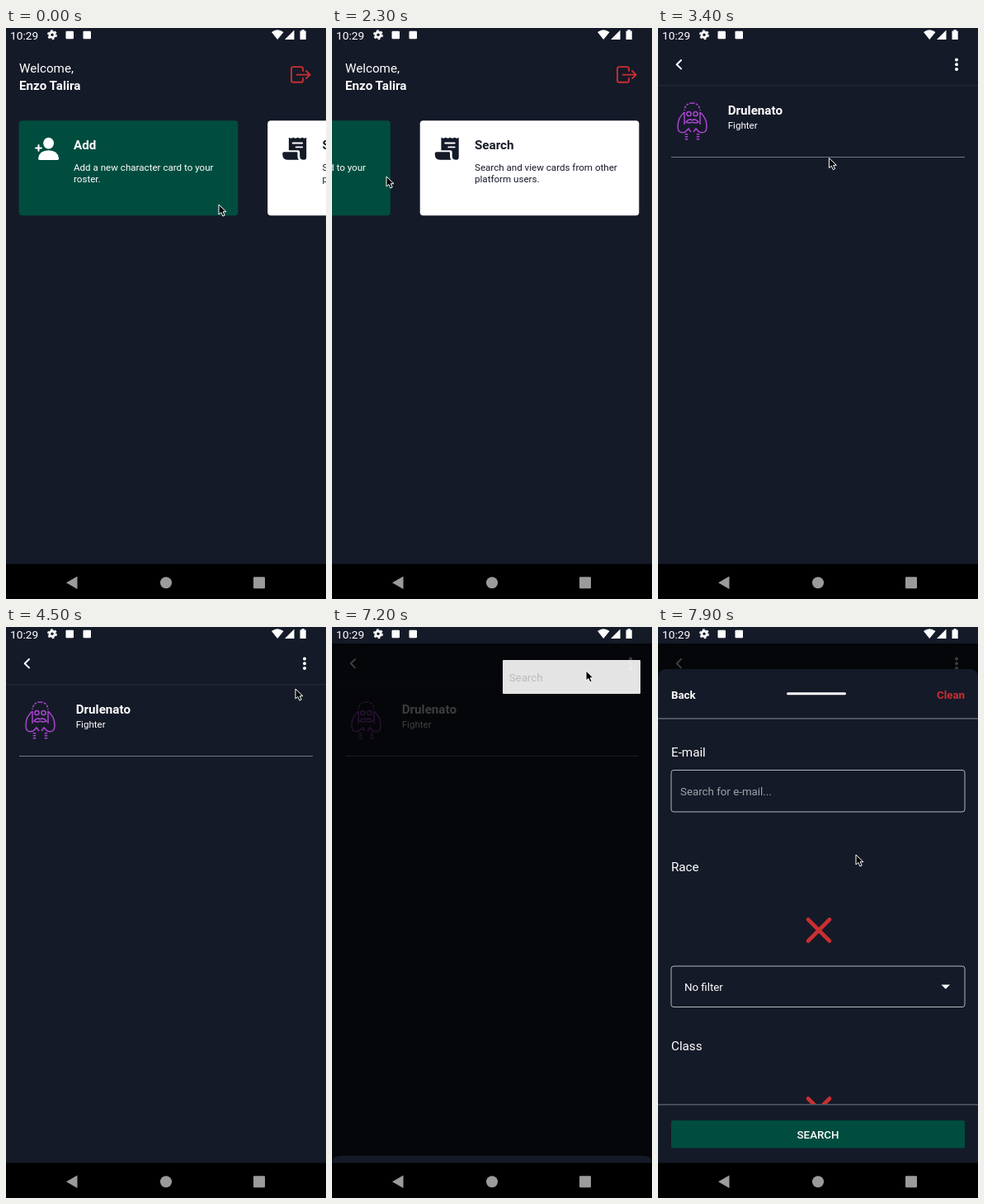
Write an HTML page that moves like this. It is 388 px wide and 692 px high and loops after 8 s.

```html
<!DOCTYPE html>
<html lang="en">
<head>
<meta charset="utf-8">
<title>Character cards</title>
<style>
  html, body { margin: 0; width: 100%; height: 100%; overflow: hidden; background: #000; }
  svg { display: block; }
  text { font: 13.3px Roboto, sans-serif; fill: #fff; }
  .title { font-size: 15.2px; }
  .small { font-size: 11.6px; }
  .bold { font-weight: 700; }
  .ink text, .bg { fill: #151a28; }
  .line { fill: none; stroke: #fff; stroke-linecap: round; stroke-linejoin: round; }
  .red { stroke: #c92f31; }
  .field { fill: none; stroke: #b4b6bb; }
</style>
</head>
<body>
<svg width="388" height="692" viewBox="0 0 388 692">
  <defs>
    <rect id="card" width="265.6" height="115" rx="4"/>
    <g id="avatarHalf">
      <path d="M41.5 91Q33 91 32 100" stroke-dasharray="3 1.5"/>
      <path d="M32 102Q24 109 24 119T33 126L37 122 40 126M32 102V117"/>
      <circle cx="37.5" cy="104" r="2.6"/>
      <path d="M41.5 112Q38 109 34 114Q38 116 41.5 114"/>
      <path d="M34.5 128V137" stroke-width="3.5" stroke-dasharray="1.5 1.5"/>
    </g>
    <path id="cross" class="line red" stroke-width="4.6" d="M-13-13L13 13M13-13L-13 13"/>
  </defs>

  <rect width="388" height="692" fill="#fff"/>

  <g id="list">
    <rect class="bg" y="20" width="388" height="630"/>
    <rect y="69" width="388" height="1.5" fill="#222735"/>
    <path class="line" stroke-width="2" d="M28 39L22.7 44.2 28 49.4"/>
    <path id="dots" class="line" stroke-width="4" stroke-dasharray="0 5.7" d="M362 38.5V51"/>
    <circle id="spinner" class="line" cx="194" cy="98" r="12.5" stroke-width="2.5" stroke-dasharray="10 90"/>
    <g id="entry">
      <g fill="none" stroke="#a945d0" stroke-width="1.5">
        <use href="#avatarHalf"/>
        <use href="#avatarHalf" transform="translate(83) scale(-1 1)"/>
      </g>
      <text class="title bold" x="84.7" y="104.8">Drulenato</text>
      <text class="small" x="84.7" y="121.5">Fighter</text>
      <rect x="16" y="156" width="356" height="1" fill="#72767e"/>
    </g>
  </g>

  <g id="home">
    <rect class="bg" y="20" width="388" height="630"/>
    <text class="title" x="16" y="54">Welcome,</text>
    <text class="title bold" x="16" y="75">Enzo Talira</text>
    <path class="line red" stroke-width="1.9" d="M360 61v2.400q0 2.300-2.300 2.300h-9.400q-2.300 0-2.300-2.300V49.400q0-2.300 2.300-2.300h9q2.700 0 2.700 2.300V52M364 52l4.600 4.600-4.600 4.600M352.500 56.600h15"/>
    <g id="cards">
      <g transform="translate(15.7 112.3)">
        <use href="#card" fill="#004d40"/>
        <g fill="#fff">
          <ellipse cx="35.900" cy="27.300" rx="6.400" ry="6.900"/>
          <path d="M23.400 46q1-10 12.500-10t12.500 10q0 1.700-1.700 1.700h-21.600q-1.700 0-1.700-1.700z"/>
          <path class="line" stroke-width="2" d="M20.400 33.100h6.800M23.800 29.700v6.800"/>
        </g>
        <text class="title bold" x="66.3" y="34.7">Add</text>
        <text class="small" x="66.3" y="61">Add a new character card to your</text>
        <text class="small" x="66.3" y="74.7">roster.</text>
      </g>
      <g class="ink" transform="translate(317.2 112.3)">
        <use href="#card" fill="#fff"/>
        <g class="bg" transform="translate(18 20.5)">
          <path d="M7.700 0l2.700 1 2.700-1 2.700 1 2.700-1 2.700 1 2.700-1 2.700 1 2.400-1V24q0 3-3 3-5 0-5-4V17.500q0-2-2-2H7.700z"/>
          <path d="M0 19.500q0-2 2-2h15.300q1 0 1 1V23q0 2.500 1.500 4H6Q0 27 0 19.500z"/>
          <path class="line" stroke-width="1.900" d="M12.500 6.700H24M16.500 11.600H24"/>
        </g>
        <text class="title bold" x="66.3" y="34.7">Search</text>
        <text class="small" x="66.3" y="61">Search and view cards from other</text>
        <text class="small" x="66.3" y="74.7">platform users.</text>
      </g>
    </g>
  </g>

  <rect id="shade" y="20" width="388" height="630"/>
  <g id="menu">
    <rect x="207" y="40" width="167" height="41" rx="1" fill="#fff"/>
    <g class="ink" id="menuText"><text x="214.7" y="65.8">Search</text></g>
  </g>

  <g id="sheet">
    <path class="bg" d="M0 650V61Q0 51 10 51H378Q388 51 388 61V650z"/>
    <text class="bold" x="16" y="86.7">Back</text>
    <rect x="156" y="79.3" width="72" height="3" rx="1.5" fill="#fff"/>
    <text class="bold" x="372" y="86.7" text-anchor="end" style="fill:#c92f31">Clean</text>
    <rect y="110.5" width="388" height="1" fill="#8b8e95"/>
    <text class="title" x="16" y="157.3">E-mail</text>
    <rect class="field" x="16" y="173.5" width="356" height="50.5" rx="3"/>
    <text x="27" y="203.7" style="fill:#a2a4a9">Search for e-mail...</text>
    <text class="title" x="16" y="296">Race</text>
    <use href="#cross" x="195" y="367.5"/>
    <rect class="field" x="16" y="411" width="356" height="49.5" rx="3"/>
    <text x="32" y="440.7">No filter</text>
    <path fill="#fff" d="M343.5 433.5h10.5l-5.2 5.2z"/>
    <text class="title" x="16" y="513">Class</text>
    <use href="#cross" x="195" y="584.5"/>
    <rect class="bg" y="578.5" width="388" height="72"/>
    <rect y="578" width="388" height="1.5" fill="#555963"/>
    <rect x="16" y="598" width="356" height="33.5" rx="2" fill="#004d40"/>
    <text x="194" y="619.6" text-anchor="middle" style="font-weight:500">SEARCH</text>
  </g>

  <g fill="#fff">
    <rect class="bg" width="388" height="20"/>
    <text x="5" y="13.7" style="font-size:13.7px">10:29</text>
    <g fill="none" stroke="#fff">
      <circle cx="56" cy="8.2" r="3.2" stroke-width="2.8"/>
      <circle cx="56" cy="8.2" r="5.2" stroke-width="1.6" stroke-dasharray="2.7 2.745"/>
    </g>
    <rect x="72.5" y="3.7" width="9.5" height="9.5" rx="1"/>
    <rect x="93.5" y="3.7" width="9.5" height="9.5" rx="1"/>
    <path d="M322 5Q329-.5 336.5 5L329.2 14zM338 14L349.5 2.5V14zM356.5 3.5h2V2h3.2v1.5h2V14h-7.2z"/>
    <rect y="649.5" width="388" height="43" fill="#000"/>
    <g fill="#9b9b9b">
      <path d="M73 672.3L86.500 664.5V680z"/>
      <circle cx="194" cy="672.3" r="7"/>
      <rect x="300" y="665.3" width="14" height="14" rx="1"/>
    </g>
  </g>

  <path id="cursor" fill="#000" stroke="#fff" d="M0 0V12L2.9 9.5 4.9 14 7.2 13 5.2 8.7H9z"/>
</svg>

<script>
const LOOP = 8000, STEP = 100;
const el = Object.fromEntries([...document.querySelectorAll('[id]')].map(e => [e.id, e]));

const ramp = (t, start, length) => Math.min(1, Math.max(0, (t - start) / length));
const smooth = (t, start, length) => {
  const p = ramp(t, start, length);
  return p * p * (3 - 2 * p);
};
const mix = (a, b, p) => a + (b - a) * p;
const zoom = (s, x = 194, y = 333) => `translate(${x} ${y}) scale(${s}) translate(${-x} ${-y})`;
const fade = (e, opacity) => e.setAttribute('opacity', opacity);
const place = (e, transform) => e.setAttribute('transform', transform);

const DRAG = [1800, 400];
// Each cursor move: start, length, end x, end y.
const MOVES = [
  [0, 500, 36, 76], [600, 400, 358, 52], [1000, 300, 38, 157], [1500, 200, 276.5, 180],
  [...DRAG, 66, 180], [2400, 400, 228, 162], [3300, 500, 30, 120], [3800, 400, 284, 134],
  [4200, 300, 351, 75], [4500, 500, 365, 46], [5700, 800, 308, 53], [7200, 700, 240, 276]
];

function cursorAt(t) {
  let x = 258, y = 214;
  for (const [start, length, endX, endY] of MOVES) {
    const p = smooth(t, start, length);
    x = mix(x, endX, p);
    y = mix(y, endY, p);
  }
  return [x, y];
}

function draw(t) {
  place(el.cursor, `translate(${cursorAt(t)})`);
  place(el.cards, `translate(${-210.5 * smooth(t, ...DRAG)})`);

  // The home screen grows and fades away over the list growing into place.
  const open = ramp(t, 2900, 400), growth = .147 * (1 - (1 - open) ** 3);
  place(el.home, zoom(1 + growth));
  fade(el.home, 1 - open ** 1.6);
  place(el.list, zoom(.853 + growth));
  fade(el.list, open);
  fade(el.entry, +(open === 1));
  fade(el.spinner, +(open < 1));
  place(el.spinner, `rotate(${-64 + (t - 3100) * .6} 194 98)`);

  const pressed = t >= 5400 && t < 5600;
  fade(el.dots, pressed ? .3 : 1);
  const menu = smooth(t, 5500, 300);
  fade(el.shade, .76 * menu);
  place(el.menu, zoom(menu, 374, 40));
  fade(el.menu, menu - smooth(t, 7150, 250));
  fade(el.menuText, t < 7000 ? 1 : .2);
  place(el.sheet, `translate(0 ${599 * (1 - smooth(t, 7160, 540))})`);
}

function tick() {
  draw(Math.floor(performance.now() % LOOP / STEP) * STEP);
  requestAnimationFrame(tick);
}
tick();
</script>
</body>
</html>
```
